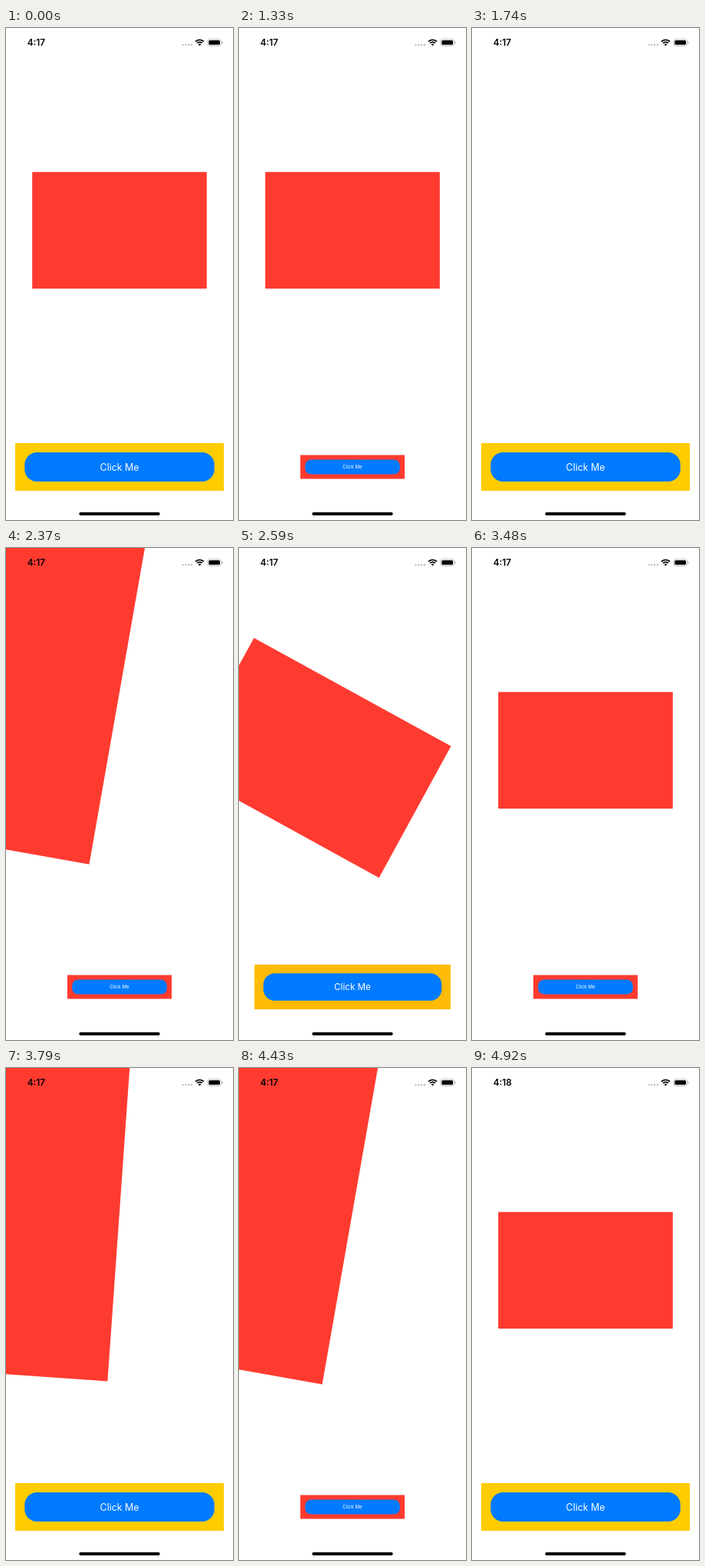
Write an HTML page with a canvas that moves like this. It is 296 by 640 pixels and loops after 5.07 s.

```html
<!DOCTYPE html>
<html lang="en">
<head>
<meta charset="utf-8">
<title>Card transition</title>
<style>
  html, body { margin: 0; width: 100%; height: 100%; overflow: hidden; background: #fff; }
  canvas { display: block; width: 296px; height: 640px; }
</style>
</head>
<body>
<canvas id="stage"></canvas>
<script>
const W = 296, H = 640, LOOP = 5070;
const CARD_MS = 350, BUTTON_MS = 290;
const RED = [255, 59, 48], YELLOW = [255, 204, 0], BLUE = [0, 122, 255];
const FONT = 'Inter, "Liberation Sans", sans-serif';

// Each tap: start, whether the card leaves, delay, and the moments the screen refreshes
const taps = [
  { at: 1330, leave: true, lag: 0, steps: [0, 110, 210, 310, 410] },
  { at: 2370, leave: false, lag: 0, steps: [0, 120, 220, 320, 510] },
  { at: 3480, leave: true, lag: 20, steps: [0, 100, 200, 310, 480] },
  { at: 4430, leave: false, lag: 0, steps: [0, 110, 210, 320, 490] }
];

const canvas = document.getElementById('stage');
const ctx = canvas.getContext('2d');
const dpr = window.devicePixelRatio || 1;
canvas.width = W * dpr;
canvas.height = H * dpr;

const rgb = c => `rgb(${c.map(Math.round).join(',')})`;
const mix = (a, b, k) => a.map((v, i) => v + (b[i] - v) * k);

// cubic-bezier(.42, 0, .58, 1)
function ease(x) {
  if (x <= 0) return 0;
  if (x >= 1) return 1;
  let lo = 0, hi = 1, u = 0.5;
  for (let i = 0; i < 24; i++) {
    u = (lo + hi) / 2;
    const v = 1 - u;
    const bx = 3 * v * v * u * 0.42 + 3 * v * u * u * 0.58 + u * u * u;
    if (bx < x) lo = u; else hi = u;
  }
  return u * u * (3 - 2 * u);
}

function stateAt(t) {
  const tap = taps.filter(e => e.at <= t).pop();
  if (!tap) return { card: 0, button: 1 };
  const step = tap.steps.filter(s => tap.at + s <= t).pop();
  const time = step - tap.lag;
  const p = ease(time / CARD_MS);
  return {
    card: tap.leave ? (p < 1 ? p : null) : 1 - p,
    button: ease(time / BUTTON_MS)
  };
}

function rounded(x, y, w, h, r, color) {
  ctx.fillStyle = color;
  ctx.beginPath();
  ctx.roundRect(x, y, w, h, r);
  ctx.fill();
}

function text(str, x, y, font, color, align) {
  ctx.font = `${font} ${FONT}`;
  ctx.fillStyle = color;
  ctx.textAlign = align;
  ctx.fillText(str, x, y);
}

// The card grows to double size and turns 100 degrees about its top centre
function drawCard(p) {
  ctx.save();
  ctx.translate(148, 187.3);
  ctx.rotate(p * 100 * Math.PI / 180);
  ctx.scale(1 + p, 1 + p);
  ctx.fillStyle = rgb(RED);
  ctx.fillRect(-113.8, 0, 227.6, 151.7);
  ctx.restore();
}

function drawButton(k) {
  const s = 0.5 + k / 2;
  ctx.save();
  ctx.translate(148, 571);
  ctx.scale(s, s);
  ctx.fillStyle = rgb(mix(RED, YELLOW, k));
  ctx.fillRect(-136, -31, 272, 62);
  rounded(-123.7, -19, 247.4, 38, 16, rgb(BLUE));
  text('Click Me', 0, 4.6, '400 12.4px', '#fff', 'center');
  ctx.restore();
}

function drawWifi(x, y) {
  const arc = (r, w) => {
    ctx.lineWidth = w;
    ctx.beginPath();
    ctx.arc(x, y, r, -Math.PI * 0.75, -Math.PI * 0.25);
    ctx.stroke();
  };
  ctx.strokeStyle = '#000';
  arc(7.8, 1.8);
  arc(4.9, 1.8);
  arc(1.4, 2.8);
}

function drawStatus(clock) {
  text(clock, 27.7, 23.2, '600 11.8px', '#000', 'left');
  ctx.fillStyle = '#b8b8b8';
  for (let i = 0; i < 4; i++) {
    ctx.beginPath();
    ctx.arc(230.6 + i * 3.8, 22, 1.15, 0, Math.PI * 2);
    ctx.fill();
  }
  drawWifi(252.5, 23.2);
  ctx.strokeStyle = '#a6a6a6';
  ctx.lineWidth = 0.8;
  ctx.beginPath();
  ctx.roundRect(263, 14.6, 17.4, 8.6, 2.6);
  ctx.stroke();
  rounded(264.4, 16, 14.6, 5.8, 1.5, '#000');
  rounded(281.4, 17.4, 1.1, 3, 0.5, '#a6a6a6');
}

function draw(t) {
  const { card, button } = stateAt(t);
  ctx.setTransform(dpr, 0, 0, dpr, 0, 0);
  ctx.fillStyle = '#fff';
  ctx.fillRect(0, 0, W, H);
  if (card !== null) drawCard(card);
  drawButton(button);
  drawStatus(t < 4920 ? '4:17' : '4:18');
  rounded(95.3, 630, 105.4, 4, 2, '#000');
}

function tick() {
  draw(performance.now() % LOOP);
  requestAnimationFrame(tick);
}
tick();
</script>
</body>
</html>
```
